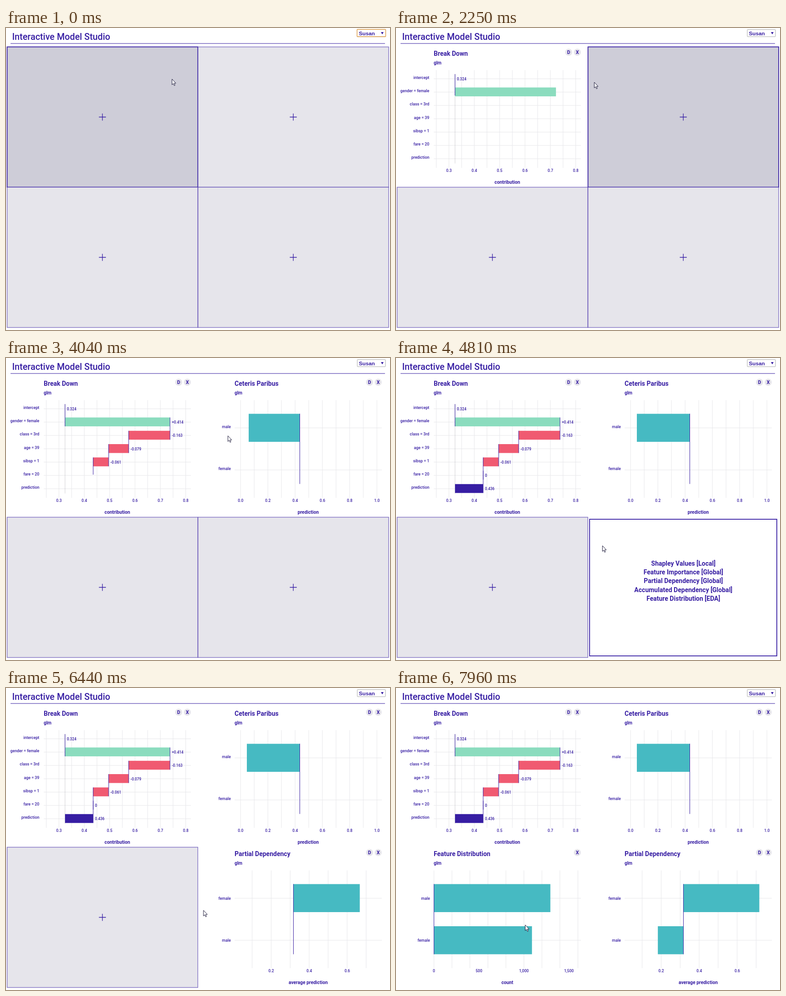
Recreate the animation shown at these times as an HTML page. Size 845 by 663 pixels, loop 7990 ms.

```html
<!DOCTYPE html>
<html lang="en">
<head>
<meta charset="utf-8">
<title>Interactive Model Studio</title>
<style>
  html, body { margin: 0; width: 100%; height: 100%; overflow: hidden; background: #fff; }
  svg { display: block; width: 845px; height: 663px; }
  text { font-family: Roboto, "Noto Sans", sans-serif; fill: #371ea3; white-space: pre; }
  .head { font-size: 19.8px; font-weight: 500; }
  .title, .item { font-size: 14px; font-weight: 700; }
  .sub { font-size: 10px; font-weight: 700; }
  .axis { font-size: 10.3px; font-weight: 700; }
  .row { font-size: 8.8px; font-weight: 500; }
  .tick { font-size: 8.5px; font-weight: 500; }
  .num { font-size: 8.2px; font-weight: 500; }
  .btn { font-size: 10.5px; font-weight: 700; }
  .pick { font: 700 11.7px "Liberation Sans", Arial, sans-serif; }
  .mid { text-anchor: middle; }
  .end { text-anchor: end; }
  .grid { stroke: #e7e7ea; stroke-width: 1; fill: none; }
  .cell { fill: #e6e5eb; stroke: #371ea3; stroke-opacity: .6; stroke-width: 1.4; }
  .hover { fill: #cecdd8; stroke: #371ea3; stroke-width: 1.7; }
  .menu { fill: #fff; stroke: #371ea3; stroke-width: 1.8; }
  .plus { stroke: #371ea3; stroke-width: 1.3; }
  .grow { transform-box: fill-box; }
  .cursor { fill: #fff; stroke: #1d1a3a; stroke-width: 1; stroke-linejoin: round; }
</style>
</head>
<body>
<svg id="stage" viewBox="0 0 845 663"></svg>
<script>
const LOOP = 7990, STEP = 470;
const INK = '#371ea3', TEAL = '#46bac2', GREEN = '#8bdcbe', RED = '#f05a71';
const EASE = 'cubic-bezier(.65,0,.35,1)';
const stage = document.getElementById('stage');
const rules = [];

function add(parent, tag, attrs = {}, content) {
  const el = document.createElementNS('http://www.w3.org/2000/svg', tag);
  for (const key in attrs) el.setAttribute(key, attrs[key]);
  if (content !== undefined) el.textContent = content;
  return parent.appendChild(el);
}
const group = (parent, x = 0, y = 0) => add(parent, 'g', { transform: `translate(${x} ${y})` });
const text = (parent, cls, x, y, content) => add(parent, 'text', { class: cls, x, y }, content);
const rect = (parent, x, y, width, height, attrs) => add(parent, 'rect', { x, y, width, height, ...attrs });
const at = ms => (ms / LOOP * 100).toFixed(3) + '%';

function animate(el, frames, timing = 'linear') {
  const name = 'k' + rules.length;
  rules.push(`@keyframes ${name}{${frames}}`);
  el.style.animation = `${name} ${LOOP}ms ${timing} infinite`;
  return el;
}

// Visible only from a to b, with hard edges.
const show = (el, a, b = LOOP) => animate(el,
  `0%{opacity:${a ? 0 : 1}}${at(a)}{opacity:1}${at(b)}{opacity:0}`, 'step-end');

// Scales along one axis from nothing to full size.
function grow(el, start, axis, origin) {
  el.classList.add('grow');
  el.style.transformOrigin = origin;
  const zero = `transform:scale${axis}(0)`, full = `transform:scale${axis}(1)`;
  const end = Math.min(start + STEP, LOOP);
  return animate(el, `0%{${zero}}${at(start)}{${zero};animation-timing-function:${EASE}}` +
    (end < LOOP ? `${at(end)}{${full}}` : '') + `100%{${full}}`);
}

function bar(parent, from, to, y, h, fill, start) {
  const el = rect(parent, Math.min(from, to), y, Math.abs(to - from), h, { fill });
  return grow(el, start, 'X', to < from ? 'right' : 'left');
}

// Header
text(stage, 'head', 13.5, 26, 'Interactive Model Studio');
rect(stage, 10, 33.4, 824, 1.2, { fill: INK, opacity: .85 });
const box = { rx: 1, fill: '#fff' };
rect(stage, 773, 3.5, 62, 15.5, { ...box, stroke: '#a9a9a9' });
show(rect(stage, 772.5, 3, 63, 16, { ...box, stroke: '#dc9a45', 'stroke-width': 1.4 }), 0, 410);
text(stage, 'pick', 776.5, 15.5, 'Susan');
add(stage, 'path', { d: 'M825 9h6l-3 5z', fill: INK });

// Empty cells and their menus
const ITEMS = ['Break Down [Local]', 'Shapley Values [Local]', 'Ceteris Paribus [Local]',
  'Feature Importance [Global]', 'Partial Dependency [Global]',
  'Accumulated Dependency [Global]', 'Feature Distribution [EDA]'];

function cell(col, row, hoverAt, menuAt, chartAt, used) {
  const x = 420 * col, y = 308 * row;
  const empty = show(group(stage, x, y), 0, menuAt);
  const area = [2.5, 41.5, 419.6, 308];
  rect(empty, ...area, { class: 'cell' });
  show(rect(empty, ...area, { class: 'hover' }), hoverAt, menuAt);
  add(empty, 'path', { class: 'plus', d: 'M204.5 195.5h15.4M212.2 187.8v15.4' });

  const menu = show(group(stage, x, y), menuAt, chartAt);
  rect(menu, 6, 46, 412, 300, { class: 'menu' });
  const items = ITEMS.filter((_, i) => !used.includes(i));
  items.forEach((item, i) =>
    text(menu, 'item mid', 212.3, 186.3 + 19.25 * (i - (items.length - 1) / 2), item));
}
cell(0, 0, 0, 520, 1385, []);
cell(1, 0, 2100, 2290, 3640, [0]);
cell(0, 1, 6500, 6670, 7885, [0, 2, 4]);
cell(1, 1, 4420, 4810, 6105, [0, 2]);

// Chart frame; grid = [first x, step, count], ticks = [first x, step, labels]
function chart(col, row, opt) {
  const g = show(group(stage, 420 * col, 308 * row), opt.from);
  text(g, 'title', 83, 61, opt.title);
  text(g, 'sub', 83, 80, 'glm');
  text(g, 'axis mid', 245, 342, opt.axis);
  [...opt.buttons].reverse().forEach((letter, i) => {
    add(g, 'circle', { cx: 399 - 19 * i, cy: 53.3, r: 7.7, fill: '#e6e5eb' });
    text(g, 'btn mid', 399 - 19 * i, 57.1, letter);
  });
  const [x0, dx, count] = opt.grid;
  let d = '';
  for (let i = 0; i < count; i++) d += `M${x0 + dx * i} 92.5V307`;
  opt.rows.forEach((label, i) => {
    const y = opt.rowY + opt.rowStep * i;
    d += `M83 ${y}H407`;
    text(g, 'row end', opt.labelX, y + opt.shift + 3, label);
  });
  add(g, 'path', { class: 'grid', d });
  const [t0, dt, labels] = opt.ticks;
  labels.forEach((label, i) => text(g, 'tick mid', t0 + dt * i, 315.6, label));
  return g;
}

// Break Down waterfall
const down = chart(0, 0, {
  from: 1385, title: 'Break Down', axis: 'contribution', buttons: 'DX',
  grid: [88.6, 27.9, 12], ticks: [116.5, 55.8, ['0.3', '0.4', '0.5', '0.6', '0.7', '0.8']],
  rows: ['intercept', 'gender = female', 'class = 3rd', 'age = 39', 'sibsp = 1', 'fare = 20', 'prediction'],
  rowY: 111.5, rowStep: 29.25, labelX: 73.3, shift: -2.7
});
const levels = [.324, .738, .575, .496, .435, .435].map(v => 116.5 + (v - .3) * 558);
const notes = ['0.324', '+0.414', '-0.163', '-0.079', '-0.061', '0', '0.436'];
const begin = 1402;
add(down, 'path', { d: 'M129.9 101.4V297', stroke: '#77747f', 'stroke-dasharray': '1 2' });
notes.forEach((note, i) => {
  const last = i === 6, y = 101.3 + 29.25 * i, start = begin + i * STEP;
  const to = levels[last ? 5 : i], from = levels[last ? 0 : Math.max(i - 1, 0)];
  if (from !== to) bar(down, from, to, y, 19.5, last ? INK : to > from ? GREEN : RED, start);
  show(text(down, 'num', Math.max(from, to) + 4, y + 13.6, note), start + STEP);
});
levels.forEach((x, i) => grow(
  rect(down, x - .5, 101.3 + 29.25 * i, 1, 48.75, { fill: INK }), begin + (i + 1) * STEP, 'Y', 'top'));

// Two-category bar charts
const BAR_TOPS = [122.5, 215];
function pair(col, row, opt, base, ends, start) {
  const g = chart(col, row, { rowY: 153.5, rowStep: 92.3, labelX: 74.7, shift: 0, ...opt });
  ends.forEach((end, i) => {
    if (end !== base) bar(g, base, end, BAR_TOPS[i], 61.5, TEAL, start + i * STEP);
  });
  rect(g, base - .5, 122.3, 1, 154.2, { fill: INK });
}
pair(1, 0, {
  from: 3640, title: 'Ceteris Paribus', axis: 'prediction', buttons: 'DX', rows: ['male', 'female'], shift: -2.4,
  grid: [96.2, 30, 11], ticks: [96.2, 60, ['0.0', '0.2', '0.4', '0.6', '0.8', '1.0']]
}, 226.5, [110, 226.5], 3658);
pair(1, 1, {
  from: 6105, title: 'Partial Dependency', axis: 'average prediction', buttons: 'DX', rows: ['female', 'male'],
  grid: [121.7, 41.8, 7], ticks: [163.5, 83.7, ['0.2', '0.4', '0.6']]
}, 212.5, [379.5, 156.2], 6118);
pair(0, 1, {
  from: 7885, title: 'Feature Distribution', axis: 'count', buttons: 'X', rows: ['male', 'female'],
  grid: [83.5, 39.6, 9], ticks: [83.5, 99, ['0', '500', '1,000', '1,500']]
}, 83.5, [383, 300], 7902);

// Pointer: [time, x, y, easing towards the next point]
const path = [
  [0, 365, 112], [750, 365, 112], [1120, 269.5, 118], [1400, 269.5, 118], [2250, 436, 119],
  [2380, 436, 119], [3280, 568, 149], [3660, 568, 149, 'ease-in'], [4040, 488, 170, 'ease-out'],
  [4700, 454, 412], [5040, 454, 412], [5850, 547.5, 487.5], [6100, 547.5, 487.5],
  [6620, 397, 488], [6800, 397, 488], [7560, 292, 514], [7610, 292, 514], [7720, 284, 520], [LOOP, 284, 520]
];
const pointer = animate(add(stage, 'g', { class: 'cursor' }), path.map(([t, x, y, ease = 'ease-in-out']) =>
  `${at(t)}{transform:translate(${x}px,${y}px);animation-timing-function:${ease}}`).join(''));
const arrow = add(pointer, 'path', { d: 'M.3 0V12.6L3.1 9.9 5.1 14.5 7 13.7 5.1 9.2H8.8Z' });
const hand = add(pointer, 'path', {
  d: 'M-1.3 11V1.3a1.3 1.3 0 0 1 2.6 0V7 6.4a1.2 1.2 0 0 1 2.4 0V9 7a1.1 1.1 0 0 1 2.2 0V9.4 8' +
     'a1 1 0 0 1 1.9 0V13c0 2-1 3-1.4 5H-.8c-.6-2-2.6-4-3.6-6.2-.5-1.3.8-2.1 1.6-1.4z'
});
const handTimes = [[1080, 1385], [3200, 3640], [5640, 6105], [7500, 7885]];
const swap = (on, off) => `0%{opacity:${off}}` +
  handTimes.map(([a, b]) => `${at(a)}{opacity:${on}}${at(b)}{opacity:${off}}`).join('');
animate(arrow, swap(0, 1), 'step-end');
animate(hand, swap(1, 0), 'step-end');

document.head.appendChild(document.createElement('style')).textContent = rules.join('\n');
</script>
</body>
</html>
```
